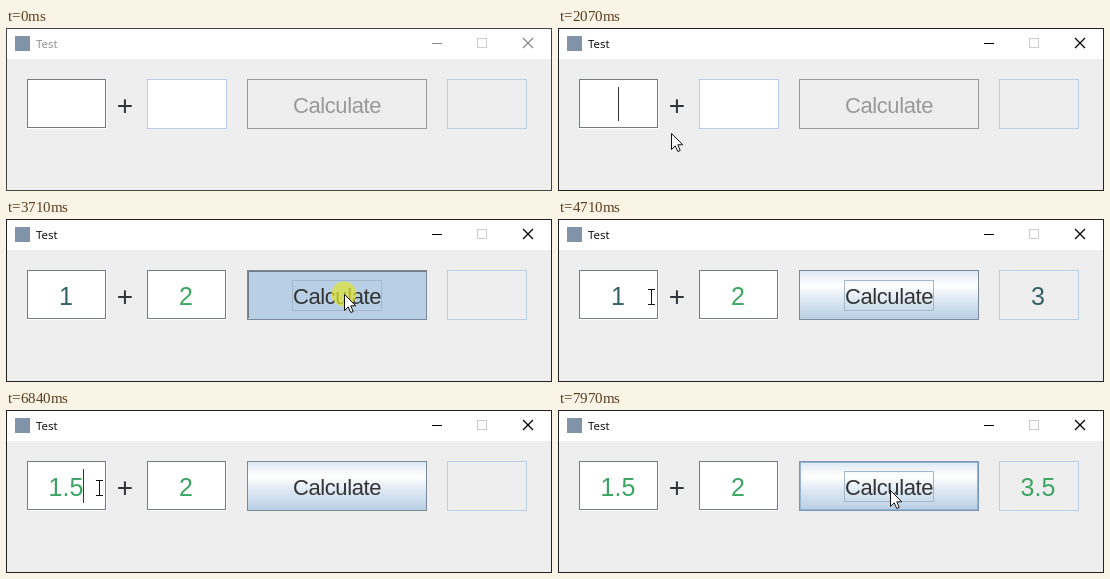
These frames come from a looping animation (546 px wide and 163 px high, 7.99 s). An HTML page with a canvas:

```html
<!DOCTYPE html>
<html lang="en">
<head>
<meta charset="utf-8">
<title>Test</title>
<style>
  html, body { margin: 0; width: 546px; height: 163px; overflow: hidden; }
  canvas { display: block; }
</style>
</head>
<body>
<canvas id="stage" width="546" height="163"></canvas>
<script>
const g = document.getElementById('stage').getContext('2d');
const LOOP = 7990, PRESS = 110, BLINK = 500;
const SANS = '"Liberation Sans", Arial, sans-serif';
const FIELD_FONT = '25px ' + SANS;
const DARK = '#757c83', PALE = '#b8cfe5', GREEN = '#3da564', TEAL = '#356468';
const FIRST = 21, SECOND = 141, BUTTON = 241, RESULT = 441;

// What the user does; each action updates the form
const actions = [
  { at: 1020, click: true, focus: FIRST },
  { at: 2200, first: '1' },
  { at: 2620, focus: SECOND },
  { at: 3250, second: '2' },
  { at: 3710, click: true, focus: BUTTON },
  { at: 4870, click: true, focus: FIRST },
  { at: 6040, first: '1.' },
  { at: 6370, first: '1.5' },
  { at: 7440, click: true, focus: BUTTON }
];

// Pointer glides to (x, y) between two times
const entry = { x: 104, y: 164 };
const moves = [
  { from: 700, to: 1000, x: 80, y: 78 },
  { from: 1520, to: 1670, x: 104, y: 106 },
  { from: 1970, to: 2730, x: 298, y: 79 },
  { from: 2830, to: 3100, x: 237, y: 79 },
  { from: 3100, to: 3590, x: 338, y: 75 },
  { from: 4160, to: 4680, x: 93, y: 77 },
  { from: 6840, to: 7380, x: 339, y: 80 },
  { from: 7940, to: 7970, x: 332, y: 80 }
];

function pointerAt(t) {
  let { x, y } = entry;
  for (const m of moves) {
    const u = Math.min(1, Math.max(0, (t - m.from) / (m.to - m.from)));
    const ease = u * u * (3 - 2 * u);
    x += (m.x - x) * ease;
    y += (m.y - y) * ease;
  }
  return { x: Math.round(x), y: Math.round(y) };
}

function formAt(t) {
  const form = { at: 0, focus: 0, first: '', second: '', result: '' };
  for (const action of actions) {
    if (action.at > t) break;
    Object.assign(form, { click: false }, action);
    if (action.first || action.second) form.result = '';
    if (action.focus === BUTTON && t >= action.at + PRESS) form.result = String(+form.first + +form.second);
  }
  return form;
}

const inside = (p, left, width = 80) => p.x >= left && p.x < left + width && p.y >= 51 && p.y < 101;
const numberColor = value => value % 2 === 1 ? TEAL : GREEN;

function fill(color, x, y, w, h) {
  g.fillStyle = color;
  g.fillRect(x, y, w, h);
}

function frame(color, x, y, w, h) {
  g.strokeStyle = color;
  g.lineWidth = 1;
  g.strokeRect(x + .5, y + .5, w - 1, h - 1);
}

function line(color, width, ...points) {
  g.strokeStyle = color;
  g.lineWidth = width;
  g.beginPath();
  points.forEach(([x, y]) => g.lineTo(x, y));
  g.stroke();
}

function text(str, x, y, font, color, align = 'center') {
  g.font = font;
  g.fillStyle = color;
  g.textAlign = align;
  g.fillText(str, x, y);
}

function drawWindow(active) {
  const ink = active ? '#000' : '#8a8a8a';
  fill('#eee', 0, 0, 546, 163);
  fill('#fff', 0, 0, 546, 31);
  fill('#8193a8', 9, 8, 15, 15);
  text('Test', 30, 20, '11.5px "Open Sans", sans-serif', ink, 'left');
  fill(ink, 426, 15, 10, 1);
  frame('#ccc', 471, 10, 10, 10);
  line(ink, 1.3, [517, 10], [527, 20]);
  line(ink, 1.3, [527, 10], [517, 20]);
  frame(active ? '#222' : '#444', 0, 0, 546, 163);
}

function drawField(x, value, enabled, background = '#fff') {
  fill(background, x, 51, 80, 50);
  if (enabled) {
    frame('#fff', x + 1, 52, 79, 49);
    frame(DARK, x, 51, 79, 49);
  } else {
    frame(PALE, x, 51, 80, 50);
  }
  text(value, x + 39, 86, FIELD_FONT, numberColor(value));
}

function drawButton(enabled, pressed, hover, focused) {
  const lit = enabled && hover && !pressed;
  if (enabled) {
    const shade = g.createLinearGradient(0, 52, 0, 100);
    [[0, '#dde8f3'], [.3, '#fff'], [.6, '#dde8f3'], [1, PALE]].forEach(s => shade.addColorStop(...s));
    fill(pressed ? PALE : shade, BUTTON, 51, 180, 50);
  }
  if (pressed) line(DARK, 1, [242.5, 99], [242.5, 52.5], [420, 52.5]);
  if (lit) frame('#96b3d0', 242, 52, 178, 48);
  frame(lit ? '#7797b8' : enabled ? '#7a8a99' : '#999', BUTTON, 51, 180, 50);
  if (focused) frame('#a3b8cc', 286, 61, 90, 31);
  g.letterSpacing = '-.4px';
  text('Calculate', 331, 85, '22px ' + SANS, enabled ? '#333' : '#999');
  g.letterSpacing = '0px';
}

function drawCaret(form, idle) {
  if (!form.focus || form.focus === BUTTON || Math.floor(idle / BLINK) % 2) return;
  g.font = FIELD_FONT;
  const value = form.focus === FIRST ? form.first : form.second;
  fill('#333', Math.round(form.focus + 39 + g.measureText(value).width / 2), 59, 1, 34);
}

const arrow = new Path2D('M.5 .5V16.5L4.2 12.9L6.8 18.5L9.2 17.5L6.8 11.8H11.8Z');

function drawPointer({ x, y }, typing, clicking) {
  g.save();
  g.translate(x, y);
  if (clicking) {
    g.fillStyle = 'rgba(222, 228, 50, .72)';
    g.beginPath();
    g.arc(typing ? -6 : 0, 0, 12.5, 0, 7);
    g.fill();
  }
  if (typing) {
    fill('#111', 0, -7, 1, 16);
    for (const end of [-7, 8]) {
      fill('#111', -3, end, 3, 1);
      fill('#111', 1, end, 3, 1);
    }
  } else {
    g.fillStyle = '#fff';
    g.strokeStyle = '#111';
    g.lineWidth = 1;
    g.fill(arrow);
    g.stroke(arrow);
  }
  g.restore();
}

function draw(t) {
  const form = formAt(t), pointer = pointerAt(t), idle = t - form.at;
  const ready = form.first !== '' && form.second !== '';
  const onButton = form.focus === BUTTON;
  const typing = inside(pointer, FIRST) || (form.first !== '' && inside(pointer, SECOND));

  drawWindow(form.focus > 0);
  drawField(FIRST, form.first, true);
  text('+', 119, 86.5, '28px ' + SANS, '#30343a');
  drawField(SECOND, form.second, form.first !== '');
  drawButton(ready, onButton && idle < PRESS, inside(pointer, BUTTON, 180), onButton);
  drawField(RESULT, form.result, false, '#eee');
  drawCaret(form, idle);
  if (t >= moves[0].from) drawPointer(pointer, typing, form.click && idle < PRESS + 10);
}

const start = performance.now();
function tick() {
  draw((performance.now() - start) % LOOP);
  requestAnimationFrame(tick);
}
tick();
</script>
</body>
</html>
```
